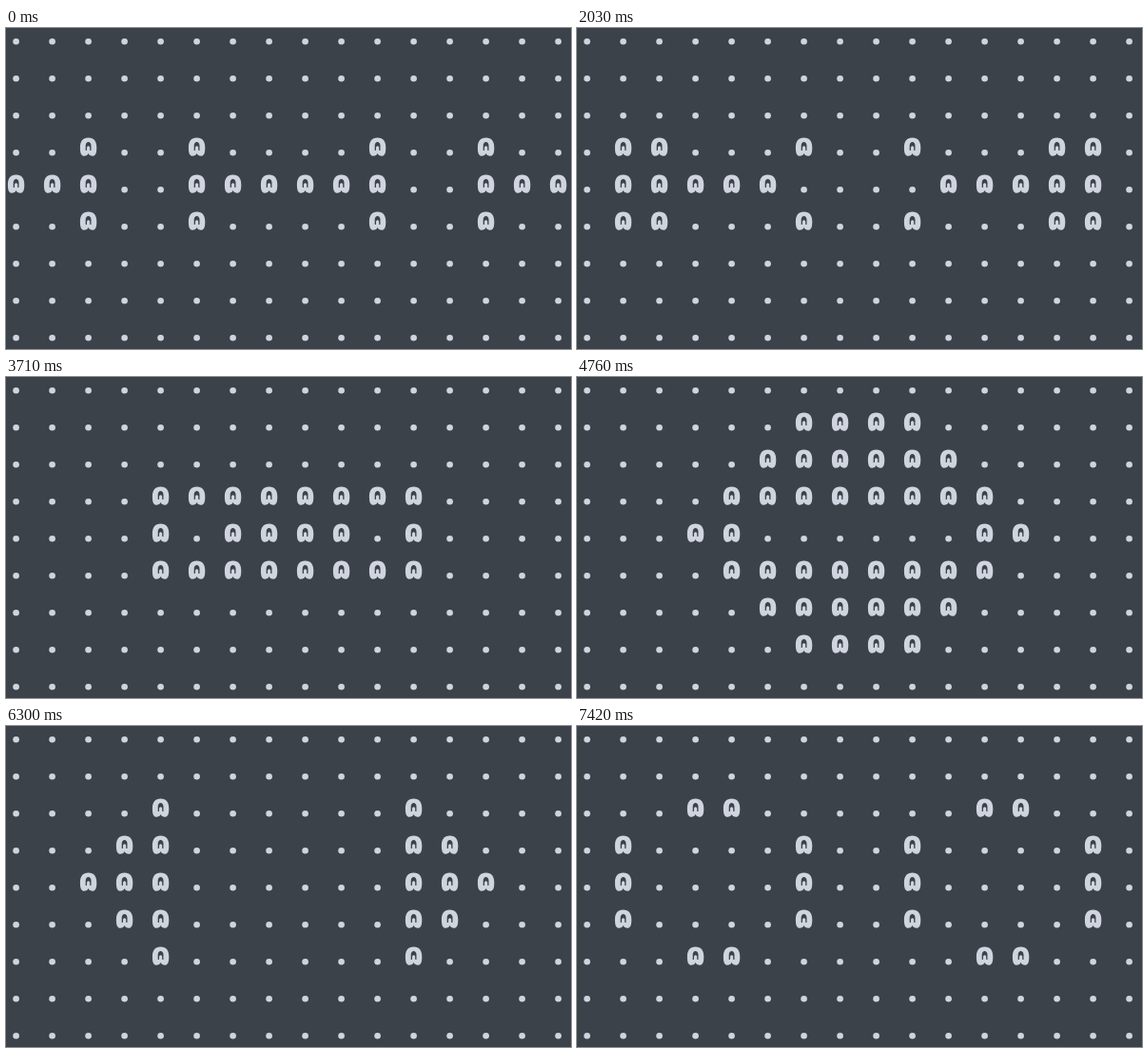
Animation of 594x338 px, one loop 7.91 s. Source, as an HTML page with a canvas:

```html
<!DOCTYPE html>
<html lang="en">
<head>
<meta charset="utf-8">
<title>Game of Life</title>
<style>
  html, body { margin: 0; width: 100%; height: 100%; overflow: hidden; background: #3c4249; }
  canvas { display: block; width: 594px; height: 338px; }
</style>
</head>
<body>
<canvas id="stage" width="594" height="338"></canvas>
<script>
const COLS = 16, ROWS = 9;
const TICK = 70, TICKS = 113;
const BACK = '#3c4249', INK = '#cfd4df';
// tick at which each generation appears
const STARTS = [0, 8, 15, 23, 31, 38, 46, 53, 61, 68, 76, 83, 91, 99, 106];

const SEED = [
  '', '', '',
  '..#..#....#..#..',
  '###..######..###',
  '..#..#....#..#..',
  '', '', ''
].map(row => Array.from({ length: COLS }, (_, c) => row[c] === '#'));

function neighbours(grid, r, c) {
  let n = 0;
  for (let y = r - 1; y <= r + 1; y++)
    for (let x = c - 1; x <= c + 1; x++)
      if ((y !== r || x !== c) && grid[y] && grid[y][x]) n++;
  return n;
}

function evolve(grid) {
  return grid.map((row, r) => row.map((alive, c) => {
    const n = neighbours(grid, r, c);
    return n === 3 || (alive && n === 2);
  }));
}

const generations = [SEED];
while (generations.length < STARTS.length) generations.push(evolve(generations.at(-1)));

// Shapes are relative to the centre of the cell's dot
const body = new Path2D(
  'M0 -15.8 C6 -15.8 8.7 -11.8 8.7 -5.5 C8.7 1 7.4 3.5 4.4 3.5 ' +
  'C2.2 3.5 .8 2.6 0 .8 C-.8 2.6 -2.2 3.5 -4.4 3.5 ' +
  'C-7.4 3.5 -8.7 1 -8.7 -5.5 C-8.7 -11.8 -6 -15.8 0 -15.8 Z');
const hollow = new Path2D(
  'M-2.9 -2.3 L-2.9 -7.4 C-2.9 -12.6 2.9 -12.6 2.9 -7.4 L2.9 -2.3 ' +
  'L1.7 -2.3 L1.5 -6 Q0 -8 -1.5 -6 L-1.7 -2.3 Z');

const ctx = document.getElementById('stage').getContext('2d');

function drawCell(alive, r, c) {
  ctx.save();
  ctx.translate(10.6 + 38 * c, 14.2 + 39 * r);
  ctx.fillStyle = INK;
  if (alive) {
    ctx.fill(body);
    ctx.fillStyle = BACK;
    ctx.fill(hollow);
  } else {
    ctx.beginPath();
    ctx.arc(0, 0, 3.3, 0, Math.PI * 2);
    ctx.fill();
  }
  ctx.restore();
}

let shown = -1;
function render(now) {
  const tick = Math.floor(now / TICK) % TICKS;
  const index = STARTS.findLastIndex(start => start <= tick);
  if (index !== shown) {
    shown = index;
    ctx.fillStyle = BACK;
    ctx.fillRect(0, 0, 594, 338);
    generations[index].forEach((row, r) => row.forEach((alive, c) => drawCell(alive, r, c)));
  }
}

const origin = performance.now();
function loop() {
  render(performance.now() - origin);
  requestAnimationFrame(loop);
}
loop();
</script>
</body>
</html>
```
